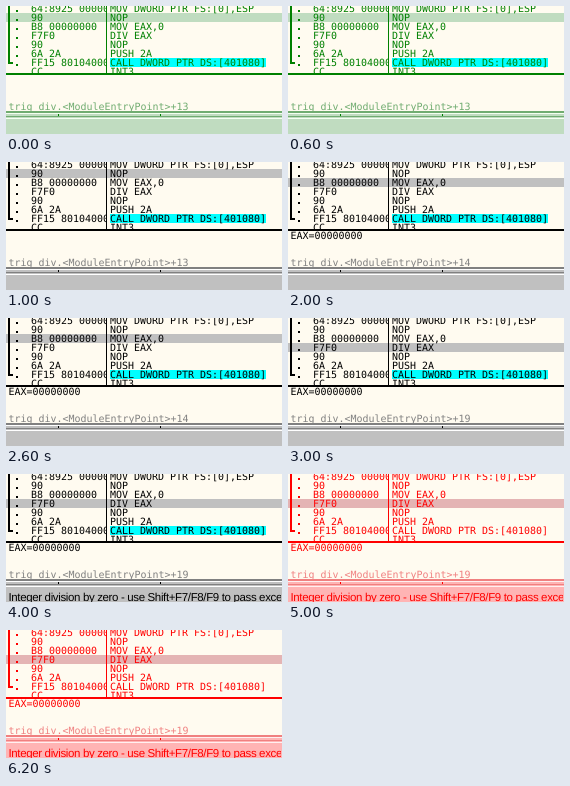
These frames come from a looping animation (276x128 px, 7 s). An HTML page:

```html
<!DOCTYPE html>
<html lang="en">
<head>
<meta charset="utf-8">
<title>Debugger stepping to a division by zero</title>
<style>
html, body { margin: 0; width: 100%; height: 100%; overflow: hidden; }
svg {
  display: block; width: 276px; height: 128px;
  animation: tint 7s step-end infinite, stepping 7s step-end infinite;
}
text {
  font: 9.97px "DejaVu Sans Mono", monospace; text-rendering: geometricPrecision;
  fill: var(--ink); white-space: pre;
}
.paper { fill: #fffbf0; }
.ink { fill: var(--ink); }
.bar { fill: var(--bar); }
.light { fill: var(--light); }
.muted, .muted text { fill: var(--muted); }
.call { fill: var(--call); }
.cursor { fill: var(--row); transform: translateY(var(--cursor)); }
.bracket { fill: none; stroke: var(--ink); stroke-width: 2; }
.at13 { opacity: var(--at13); }
.at14 { opacity: var(--at14); }
.at19 { opacity: var(--at19); }
.result { opacity: calc(1 - var(--at13)); }
.status {
  font: 11.5px "Liberation Sans", Arial, sans-serif; letter-spacing: -.36px;
  opacity: var(--status);
}

@keyframes tint {
  0% { --ink: #008000; --row: #c0dcc0; --bar: #c0dcc0; --light: #f4fff0; --muted: #70ac70; --call: #00ffff; }
  14.2857%, 57.1428% { --ink: #000; --row: #c0c0c0; --bar: #c0c0c0; --light: #fff; --muted: #808080; --call: #00ffff; }
  71.4285%, 100% { --ink: #ff0000; --row: #e4b4b4; --bar: #ffb4b4; --light: #fff0f0; --muted: #f08080; --call: #fffbf0; }
}
@keyframes stepping {
  0% { --cursor: 7px; --at13: 1; --at14: 0; --at19: 0; --status: 0; }
  28.5714% { --cursor: 16px; --at13: 0; --at14: 1; --at19: 0; --status: 0; }
  42.8571% { --cursor: 25px; --at13: 0; --at14: 0; --at19: 1; --status: 0; }
  57.1428%, 100% { --cursor: 25px; --at13: 0; --at14: 0; --at19: 1; --status: 1; }
}
</style>
</head>
<body>
<svg viewBox="0 0 276 128">
  <clipPath id="code"><rect width="276" height="67"/></clipPath>
  <clipPath id="bytes"><rect width="100" height="67"/></clipPath>
  <clipPath id="message"><rect width="275" height="128"/></clipPath>

  <rect class="paper" width="276" height="128"/>
  <rect class="cursor" width="276" height="9"/>
  <rect class="call" x="104" y="52" width="156" height="9"/>
  <g id="dots" class="ink"></g>
  <g id="hex" clip-path="url(#bytes)"></g>
  <g id="commands" clip-path="url(#code)"></g>
  <path class="bracket" d="M3 0V57H7"/>
  <rect class="ink" x="100" width="1" height="67"/>
  <rect class="ink" y="67" width="276" height="2"/>

  <text class="result" x="2.5" y="77">EAX=00000000</text>
  <g class="muted">
    <text x="2.5" y="104">trig_div.&lt;ModuleEntryPoint&gt;+1</text>
    <text class="at13" x="176.5" y="104">3</text>
    <text class="at14" x="176.5" y="104">4</text>
    <text class="at19" x="176.5" y="104">9</text>
  </g>

  <rect class="bar" y="105" width="276" height="23"/>
  <rect class="muted" y="105" width="276" height="2"/>
  <rect class="light" y="107" width="276" height="1"/>
  <rect class="ink" x="52" y="108" width="1" height="2"/>
  <rect class="ink" x="154" y="108" width="1" height="2"/>
  <rect class="muted" y="110" width="276" height="1"/>
  <rect class="light" y="112" width="276" height="1"/>
  <g clip-path="url(#message)">
    <text class="status" x="2.5" y="127">Integer division by zero - use Shift+F7/F8/F9 to pass exce</text>
  </g>
</svg>
<script>
const listing = [
  ["64:8925 00000000", "MOV DWORD PTR FS:[0],ESP"],
  ["90", "NOP"],
  ["B8 00000000", "MOV EAX,0"],
  ["F7F0", "DIV EAX"],
  ["90", "NOP"],
  ["6A 2A", "PUSH 2A"],
  ["FF15 80104000", "CALL DWORD PTR DS:[401080]"],
  ["CC", "INT3"]
];

function add(parentId, tag, attributes, content = "") {
  const parent = document.getElementById(parentId);
  const node = document.createElementNS(parent.namespaceURI, tag);
  for (const [name, value] of Object.entries(attributes)) node.setAttribute(name, value);
  node.textContent = content;
  parent.append(node);
}

listing.forEach(([bytes, command], row) => {
  const y = 6 + 9 * row;
  add("hex", "text", { x: 25, y }, bytes);
  add("commands", "text", { x: 104, y }, command);
  if (y < 66) add("dots", "rect", { x: 10, y: y - 2, width: 2, height: 2 });
});
</script>
</body>
</html>
```
